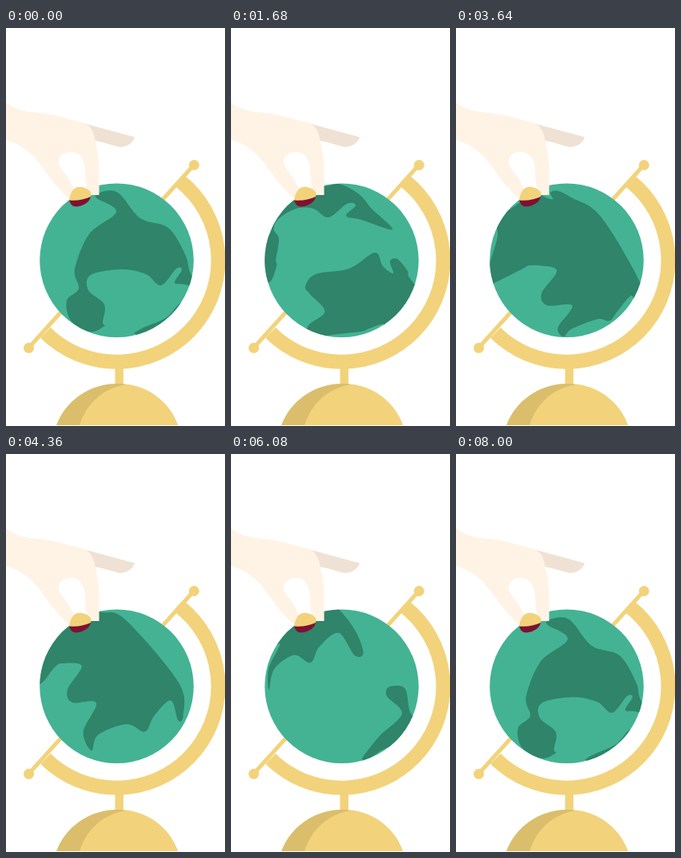
An HTML page that plays this animation: 274x498 px, repeating every 8040 ms.

```html
<!DOCTYPE html>
<html lang="en">
<head>
<meta charset="utf-8">
<title>Spinning globe</title>
<style>
  html, body { margin: 0; width: 100%; height: 100%; overflow: hidden; background: #fff; }
  svg { display: block; width: 274px; height: 498px; }
</style>
</head>
<body>
<svg viewBox="0 0 274 498">
  <clipPath id="disc"><circle cx="138.5" cy="290.7" r="96.3"/></clipPath>

  <g fill="none" stroke="#f2d37b">
    <path d="M235 171.500L28.500 400" stroke-width="5"/>
    <circle cx="138.5" cy="290.7" r="127" stroke-width="18" pathLength="360"
      stroke-dasharray="185.500 360" transform="rotate(-51 138.5 290.7)"/>
    <path d="M141.700 420V450" stroke-width="10.500"/>
  </g>
  <g fill="#f2d37b">
    <circle cx="235.300" cy="171.500" r="6.500"/>
    <circle cx="28.500" cy="400.300" r="6.500"/>
  </g>
  <path fill="#dabe6c" d="M63 497C74 467 104 445 139 445C174 445 204 467 215 497Z"/>
  <path fill="#f2d37b" d="M92 497C100 470 123 449 152 446C180 449 206 470 215 497Z"/>

  <circle cx="138.5" cy="290.7" r="96.3" fill="#43b394"/>
  <path id="land" clip-path="url(#disc)" fill="#2f8469"/>

  <path fill="#efe2d4" d="M91 117.500L161 136.500C159 144 151 149 142 149C133 147 123 143 111 141Z"/>
  <path fill="#fef3e5" d="M0 93C13 103 25 105 41 106C62 108 76 114 93 117.500C102 119 108 126 110 134C113 146 116 160 116.500 176L116.500 209L106 209L101 200C99 192 100 181 98 170C95 160 89 155 81 155C71 155 64 162 66 170C69 178 77 184 80 192L85 201L80 214C72 208 64 199 56 189C45 173 35 158 20 149C13 144 6 142 0 140Z"/>
  <path fill="#7e1133" d="M79 215Q93 215 106 210C106 217 97 223 88 223.500C83 223.500 80 220 79 215Z"/>
  <path fill="#f2d37b" d="M79 215.500C80 209 82 203 87 200C93 197 101 200 106 205Q107 208 106 211Q93 217 79 215.500Z"/>
</svg>
<script>
const LOOP = 8040, STEP = 40;
const CX = 138.5, CY = 290.7, R = 96.3;
const EDGE = R * Math.PI / 2;
const VX = -0.0465, VY = -0.0545; // map drift, px per ms

// Capes and bays of each coast: a time, then x, y pairs as seen on the globe at that time.
const westLand = [
  [0, 117,206, 140,206, 168,238, 203,250, 224,283],
  [1680, 176,226, 202,252, 163,240, 144,235, 156,222, 145,220, 122,237],
  [0, 175,308, 145,302, 106,309, 103,328, 123,346, 121,368],
  [1680, 57,298, 48,318],
  [0, 81,366, 76,341, 91,326, 86,302, 104,258, 138,230],
  [-1960, 195,303]
];
const eastLand = [
  [1680, 93,323, 106,308, 148,301, 180,281, 190,298, 203,307, 199,292, 208,289],
  [2520, 194,263, 221,290],
  [5080, 190,250, 206,298, 197,304, 179,272, 155,292, 144,314, 118,301, 84,316, 77,342, 68,312, 83,274],
  [3640, 114,347, 107,332, 126,303, 95,297, 82,302, 50,318],
  [2520, 72,361, 64,342, 81,314, 66,290]
];

// Globe point to flat map point at time zero.
function flatten(x, y, t) {
  const dx = x - CX, dy = y - CY, r = Math.hypot(dx, dy);
  const k = r ? R * Math.asin(Math.min(1, r / R)) / r : 1;
  return [dx * k - VX * t, dy * k - VY * t];
}

// Flat map point to globe point; far points land outside the disc.
function bulge([mx, my], t) {
  const dx = mx + VX * t, dy = my + VY * t, r = Math.hypot(dx, dy);
  const out = r < EDGE ? R * Math.sin(r / R) : R + r - EDGE;
  const k = r ? out / r : 1;
  return [CX + dx * k, CY + dy * k];
}

function coast(parts) {
  const points = [];
  for (const [t, ...xy] of parts)
    for (let i = 0; i < xy.length; i += 2) points.push(flatten(xy[i], xy[i + 1], t));
  return points;
}

// Closed Catmull-Rom curve.
function smooth(p) {
  const n = p.length, at = i => p[(i + n) % n];
  const fmt = (x, y) => x.toFixed(2) + ' ' + y.toFixed(2);
  let d = 'M' + fmt(...p[0]);
  for (let i = 0; i < n; i++) {
    const a = at(i - 1), b = at(i), c = at(i + 1), e = at(i + 2);
    d += 'C' + fmt(b[0] + (c[0] - a[0]) / 6, b[1] + (c[1] - a[1]) / 6)
      + ' ' + fmt(c[0] - (e[0] - b[0]) / 6, c[1] - (e[1] - b[1]) / 6)
      + ' ' + fmt(...c);
  }
  return d + 'Z';
}

const lands = [westLand, eastLand].map(coast);
const landPath = document.getElementById('land');

function draw(t) {
  let d = '';
  for (const turn of [-LOOP, 0, LOOP])
    for (const land of lands) d += smooth(land.map(p => bulge(p, t + turn)));
  landPath.setAttribute('d', d);
}

const start = performance.now();
function tick() {
  const t = (performance.now() - start) % LOOP;
  draw(Math.floor(t / STEP) * STEP);
  requestAnimationFrame(tick);
}
tick();
</script>
</body>
</html>
```
